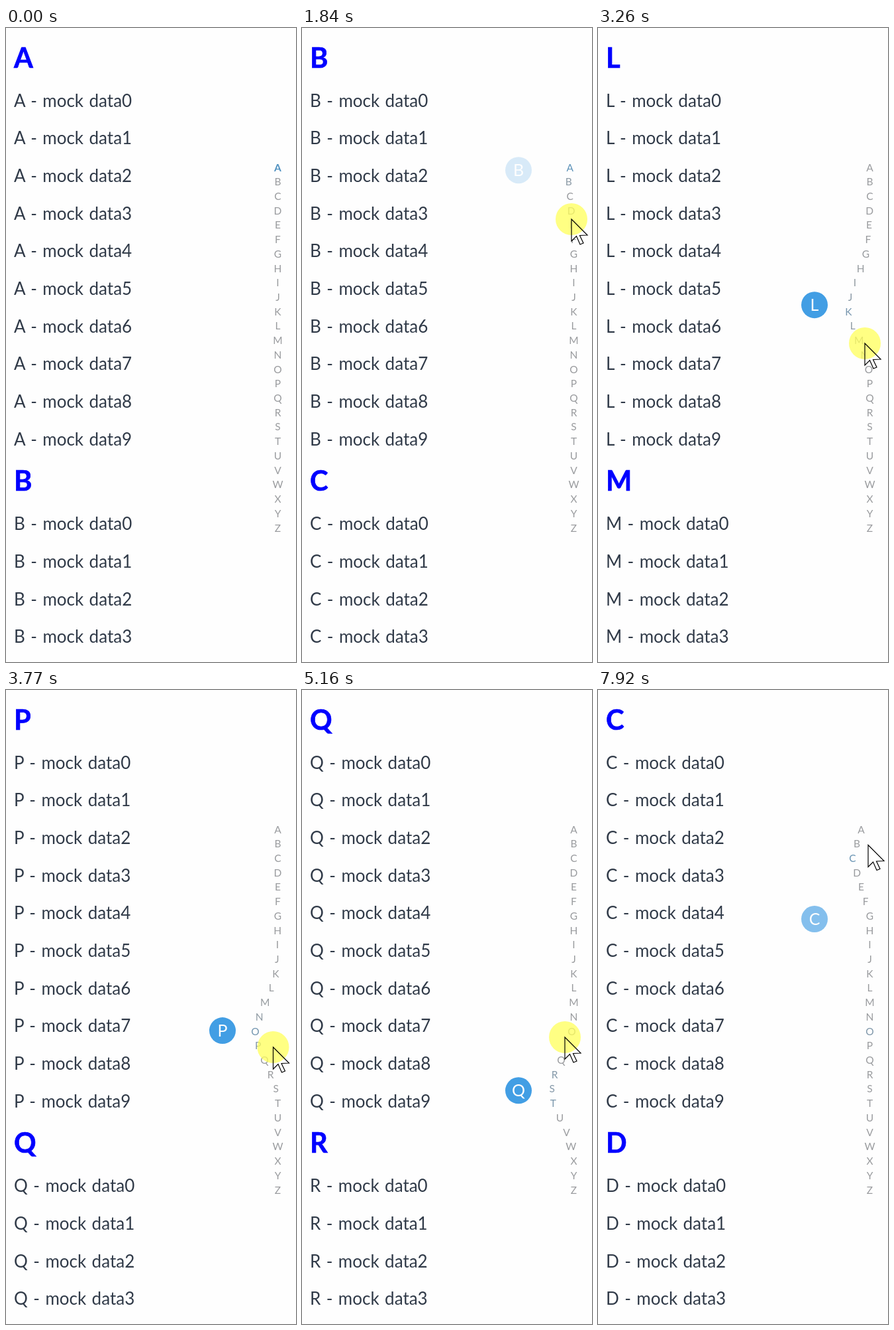
Animation of 438 by 955 pixels, one loop 8000 ms. Source, as an HTML page:

```html
<!DOCTYPE html>
<html lang="en">
<head>
<meta charset="utf-8">
<title>Index list</title>
<style>
  html, body { margin: 0; height: 100%; overflow: hidden; background: #fefefe; }
  svg { display: block; width: 100vw; height: 100vh; font-family: Lato, sans-serif; }
  .head { font-size: 41.5px; font-weight: 700; fill: #00f; stroke: #00f; stroke-width: .7px; }
  .item { font-size: 26px; word-spacing: 1.8px; fill: #303a48; }
  .index { font-size: 15.5px; text-anchor: middle; }
  .bubble { font-size: 25px; text-anchor: middle; fill: #fff; }
</style>
</head>
<body>
<svg viewBox="0 0 438 955">
  <defs><path id="arrow" d="M0 0V33L7.5 25.5L13 38L18 36L12.5 24.5L24 24Z"/></defs>
  <g id="list"></g>
  <g id="index" class="index"></g>
  <g id="bubble" class="bubble">
    <circle cx="327" r="20" fill="#429ee4"/>
    <text x="327" y="9"></text>
  </g>
  <g id="cursor">
    <use href="#arrow" fill="#fff"/>
    <circle id="press" r="24" fill="#ffff5a" fill-opacity=".75"/>
    <use href="#arrow" fill="none" stroke="#000" stroke-width="1.2"/>
  </g>
</svg>
<script>
const LOOP = 8000, EASE_MS = 350, TOP = 210, STEP = 21.72, ROW = 56.67;
const LETTERS = [...'ABCDEFGHIJKLMNOPQRSTUVWXYZ'];
const $ = id => document.getElementById(id);
const mix = (a, b, p) => a + (b - a) * p;

// One drag selects each letter on its way; power bends its speed
function drag(from, to, start, end, power = 1) {
  const a = LETTERS.indexOf(from), b = LETTERS.indexOf(to), n = Math.abs(b - a);
  return Array.from({ length: n + 1 }, (_, i) => ({
    time: start + (end - start) * (n ? i / n : 0) ** power,
    letter: a + Math.sign(b - a) * i,
    open: 1
  }));
}

const EVENTS = [
  ...drag('B', 'L', 1796, 3201, .8),
  ...drag('L', 'T', 3201, 4385, 1.3).slice(1),
  ...drag('T', 'Q', 4820, 5148, .6).slice(1),
  ...drag('O', 'O', 5560, 5560),
  { time: 5960, letter: LETTERS.indexOf('O'), open: 0 },
  ...drag('C', 'C', 7818, 7818)
];

// Pointer key points: [time, x, y]
const PATH = [
  [450, 430, 263], [640, 398, 221], [960, 411, 225], [1450, 411, 228], [1850, 407, 288],
  [3250, 403, 475], [4250, 404, 601], [4750, 404, 601], [5150, 397, 523], [5500, 401, 502],
  [6350, 401, 502], [6650, 470, 280], [6850, 437, 228.5], [7050, 404, 235], [7350, 408, 233.5],
  [LOOP, 408, 233.5]
];
const PRESSES = [[1050, 5700], [7630, 7800]];

// cubic-bezier(.25, .1, .25, 1)
function ease(x) {
  if (x >= 1) return 1;
  let lo = 0, hi = 1;
  for (let i = 0; i < 20; i++) {
    const s = (lo + hi) / 2;
    if (.75 * s * (1 - s) + s ** 3 < x) lo = s; else hi = s;
  }
  return .3 * lo * (1 - lo) ** 2 + 3 * (1 - lo) * lo * lo + lo ** 3;
}

const pose = (letter, open) => [
  { at: letter, open },
  ...LETTERS.map((_, i) => ({
    shift: open * Math.max(0, 40 - 10 * Math.abs(i - letter)),
    active: +(i === letter)
  }))
];

const blend = (a, b, p) =>
  Object.fromEntries(Object.keys(a).map(key => [key, mix(a[key], b[key], p)]));

// Each selection eases on from wherever the one before had got to
function stateAt(t) {
  let parts = pose(0, 0), letter = 0;
  EVENTS.forEach((event, k) => {
    if (t < event.time) return;
    const end = Math.min(t, EVENTS[k + 1]?.time ?? LOOP);
    const p = ease((end - event.time) / EASE_MS);
    const goal = pose(event.letter, event.open);
    parts = parts.map((part, i) => blend(part, goal[i], p));
    letter = event.letter;
  });
  const [bubble, ...marks] = parts;
  return { bubble, marks, letter };
}

function pointerAt(t) {
  const k = PATH.findIndex(point => point[0] > t);
  if (k < 1) return null;
  const [a, b] = [PATH[k - 1], PATH[k]], p = (t - a[0]) / (b[0] - a[0]);
  return [mix(a[1], b[1], p), mix(a[2], b[2], p)];
}

function addText(parent, x, y, className, content = '') {
  const el = document.createElementNS('http://www.w3.org/2000/svg', 'text');
  el.setAttribute('x', x);
  el.setAttribute('y', y);
  el.setAttribute('class', className);
  el.textContent = content;
  parent.append(el);
  return el;
}

function addSection(y, count) {
  const head = addText($('list'), 12, y + 59.5, 'head');
  const items = Array.from({ length: count }, (_, i) =>
    addText($('list'), 12, y + 118.8 + i * ROW, 'item'));
  return { head, items };
}

const sections = [addSection(0, 10), addSection(637.5, 4)];
const markTexts = LETTERS.map((l, i) => addText($('index'), 410.5, TOP + 5.5 + i * STEP, '', l));
const bubbleText = $('bubble').querySelector('text');
let shown;

function showList(letter) {
  if (letter === shown) return;
  shown = letter;
  sections.forEach(({ head, items }, k) => {
    const name = LETTERS[letter + k];
    head.textContent = name;
    items.forEach((el, i) => el.textContent = `${name} - mock data${i}`);
  });
  bubbleText.textContent = LETTERS[letter];
}

function draw(t) {
  const { bubble, marks, letter } = stateAt(t);
  showList(letter);
  markTexts.forEach((el, i) => {
    const { shift, active } = marks[i];
    el.setAttribute('x', 410.5 - shift);
    el.setAttribute('fill', `rgb(${mix(153, 80, active)},${mix(155, 145, active)},${mix(158, 192, active)})`);
    el.setAttribute('font-weight', active > .93 && bubble.open < .1 ? 700 : 400);
  });
  $('bubble').setAttribute('transform', `translate(0 ${TOP + bubble.at * STEP})`);
  $('bubble').setAttribute('opacity', bubble.open);

  const pointer = pointerAt(t);
  $('cursor').style.display = pointer ? '' : 'none';
  if (pointer) $('cursor').setAttribute('transform', `translate(${pointer})`);
  $('press').style.display = PRESSES.some(([a, b]) => t >= a && t < b) ? '' : 'none';
}

// The screen refreshes ten times a second
const TICK = 100, PHASE = 20, SAMPLE = 30;
const origin = performance.now();
function frame() {
  const t = (performance.now() - origin) % LOOP;
  draw(Math.floor((t - PHASE) / TICK) * TICK + PHASE + SAMPLE);
  requestAnimationFrame(frame);
}
frame();
</script>
</body>
</html>
```
